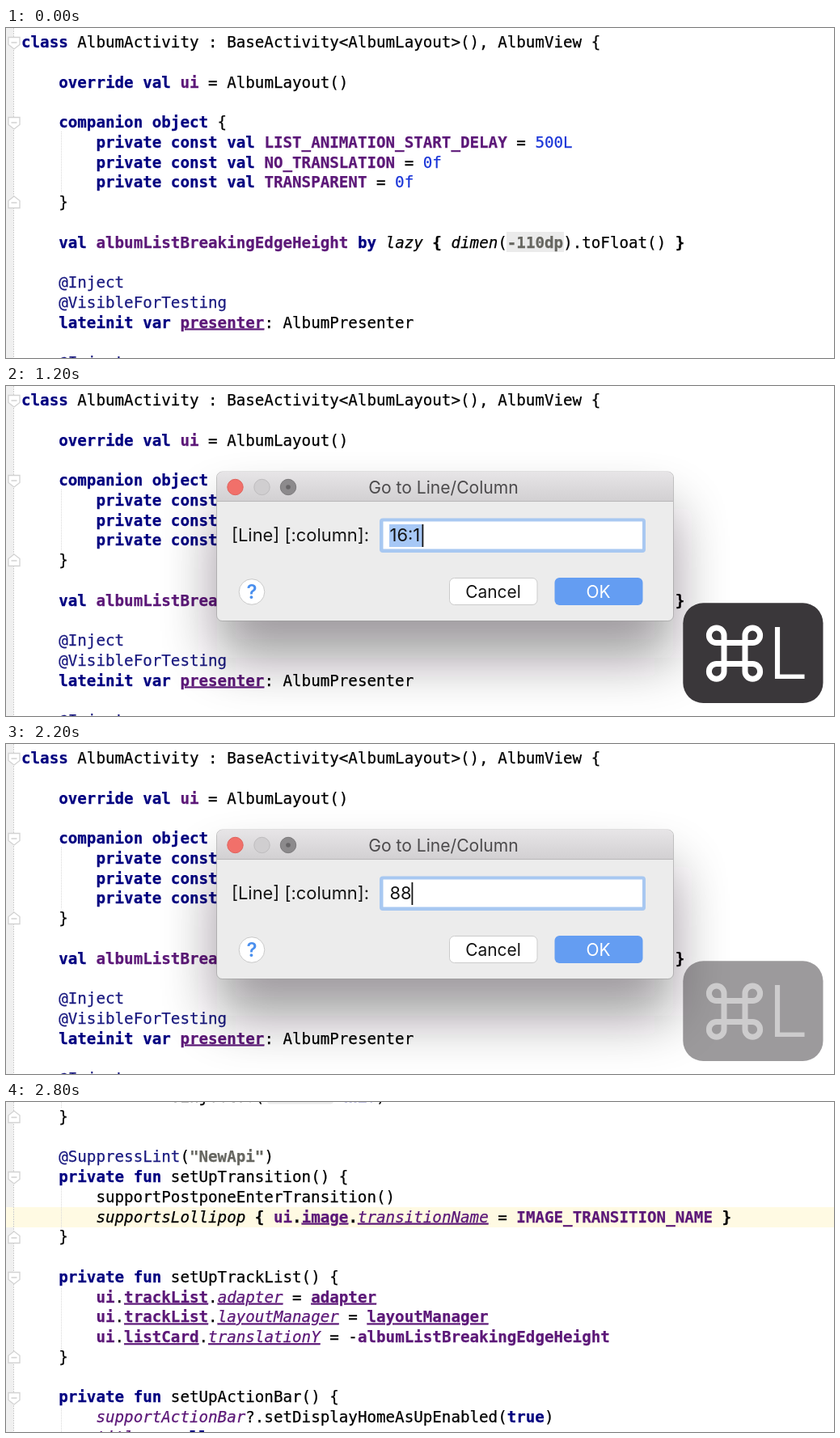
Recreate the animation shown at these times as an HTML page. Size 1024 by 408 pixels, loop 3.2 s.

```html
<!DOCTYPE html>
<html lang="en">
<head>
<meta charset="utf-8">
<title>Go to line</title>
<style>
html, body { margin: 0; width: 100%; height: 100%; overflow: hidden; background: #fff; }
svg { display: block; width: 100vw; height: 100vh; }
text { white-space: pre; }
.code { font: 19.2px "DejaVu Sans Mono", monospace; color: #000; }
.code text, .code tspan { fill: currentColor; stroke: currentColor; stroke-width: .25px; }
.k, .p, .u, .b, .f { font-weight: bold; }
.k { color: #000080; }
.a { color: #1a1a80; }
.n { color: #1a35d8; }
.p, .u, .q, .v { color: #5c1878; }
.u, .v { text-decoration: underline 1.4px; text-underline-offset: 3px; text-decoration-skip-ink: none; }
.i, .q, .v { font-style: italic; }
.f { color: #666660; }
.ui { font: 20.9px Inter, "Open Sans", sans-serif; fill: #141414; }
.big { font-size: 21.9px; }
.mid { text-anchor: middle; }
</style>
</head>
<body>
<svg viewBox="0 0 1024 408">
  <defs>
    <linearGradient id="bar" x2="0" y2="1">
      <stop stop-color="#e7e5e7"/><stop offset="1" stop-color="#d2d0d2"/>
    </linearGradient>
    <filter id="blur" filterUnits="userSpaceOnUse" x="100" y="20" width="900" height="540">
      <feGaussianBlur stdDeviation="34"/>
    </filter>
  </defs>
  <rect width="1024" height="408" fill="#fff"/>
  <rect width="9" height="408" fill="#f0f0f0"/>
  <rect id="row" y="130" width="1024" height="25" fill="#fffae3"/>
  <path d="M9.5 0V408" stroke="#cfcfcf" stroke-dasharray="2 1"/>
  <g id="top" class="code"></g>
  <g id="bottom" class="code"></g>
  <rect id="caret" x="19" y="131" width="2.4" height="23"/>

  <g id="dialog" class="ui">
    <rect x="261" y="152" width="564" height="184" rx="8" fill="#120816" opacity=".42" filter="url(#blur)"/>
    <rect x="260.5" y="106" width="565" height="184.5" rx="7" fill="#ececec" stroke="#000" stroke-opacity=".2"/>
    <path d="M261 142V113a7 7 0 0 1 7-7H818a7 7 0 0 1 7 7V142Z" fill="url(#bar)"/>
    <path d="M261 142.5H825" stroke="#b9b7b9"/>
    <circle cx="283.5" cy="125" r="9.7" fill="#f1706a" stroke="#e0605a"/>
    <circle cx="316.5" cy="125" r="9.7" fill="#d0ced0" stroke="#bebcbe"/>
    <circle cx="349" cy="125" r="9.7" fill="#8c8a8c" stroke="#7c7a7c"/>
    <circle cx="349" cy="125" r="2.8" fill="#666466"/>
    <text class="mid" x="541" y="133" fill="#4c4a4c" font-size="21.1">Go to Line/Column</text>
    <text class="big" x="279" y="192">[Line] [:column]:</text>
    <rect x="462" y="163.5" width="329" height="42.5" rx="4" fill="#a8c8f1"/>
    <rect x="466.5" y="167.5" width="320.5" height="34" fill="#fff"/>
    <rect id="pick" x="474" y="171" width="41" height="28" fill="#a7c8f6"/>
    <text id="entry" class="big" x="474.5" y="192"></text>
    <rect id="bead" y="171" width="1.8" height="28"/>
    <circle cx="304" cy="254.5" r="15.8" fill="#fff" stroke="#c9c9c9"/>
    <text class="mid" x="304" y="263" font-size="24" font-weight="600" fill="#4a8fee">?</text>
    <rect x="548.5" y="237.5" width="108.5" height="33" rx="6" fill="#fff" stroke="#cbcbcb"/>
    <text class="mid" x="602.5" y="262">Cancel</text>
    <rect x="678.5" y="237" width="109" height="34" rx="6" fill="#649df2"/>
    <text class="mid" x="732.5" y="262" fill="#fff">OK</text>
  </g>

  <g id="keys">
    <rect x="837.3" y="268.3" width="173.2" height="123.7" rx="25" fill="#3a373a"/>
    <path d="M888 308.3V352.9a9.3 9.3 0 1 1-9.3-9.3H923.3a9.3 9.3 0 1 1-9.3 9.3V308.3a9.3 9.3 0 1 1 9.3 9.3H878.7a9.3 9.3 0 1 1 9.3-9.3Z"
      fill="none" stroke="#fff" stroke-width="7"/>
    <text x="942.5" y="362" fill="#fff" style="font:350 88px Inter,sans-serif">L</text>
  </g>
</svg>
<script>
const NS = 'http://www.w3.org/2000/svg';
const $ = id => document.getElementById(id);
const LEFT = 19, PITCH = 24.75, LOOP = 3200;

// Spans are written ~style text~
const head = [
  '~k class~ AlbumActivity : BaseActivity<AlbumLayout>(), AlbumView {',
  '',
  '    ~k override val~ ~p ui~ = AlbumLayout()',
  '',
  '    ~k companion object~ {',
  '        ~k private const val~ ~p LIST_ANIMATION_START_DELAY~ = ~n 500L~',
  '        ~k private const val~ ~p NO_TRANSLATION~ = ~n 0f~',
  '        ~k private const val~ ~p TRANSPARENT~ = ~n 0f~',
  '    }',
  '',
  '    ~k val~ ~p albumListBreakingEdgeHeight~ ~k by~ ~i lazy~ ~b {~ ~i dimen~(~f -110dp~).toFloat() ~b }~',
  '',
  '    ~a @Inject~',
  '    ~a @VisibleForTesting~',
  '    ~k lateinit var~ ~u presenter~: AlbumPresenter',
  '',
  '    ~a @Inject~'
];

const body = [
  '                .injectTo(        ~k this~)',
  '    }',
  '',
  '    ~a @SuppressLint~(~f "NewApi"~)',
  '    ~k private fun~ setUpTransition() {',
  '        supportPostponeEnterTransition()',
  '        ~i supportsLollipop~ ~b {~ ~p ui~~b .~~u image~~b .~~v transitionName~ = ~p IMAGE_TRANSITION_NAME~ ~b }~',
  '    }',
  '',
  '    ~k private fun~ setUpTrackList() {',
  '        ~p ui~.~u trackList~.~v adapter~ = ~u adapter~',
  '        ~p ui~.~u trackList~.~v layoutManager~ = ~u layoutManager~',
  '        ~p ui~.~u listCard~.~v translationY~ = -~p albumListBreakingEdgeHeight~',
  '    }',
  '',
  '    ~k private fun~ setUpActionBar() {',
  '        ~q supportActionBar~?.setDisplayHomeAsUpEnabled(~k true~)',
  '        ~q title~ = ~k null~'
];

function add(parent, tag, attrs, text) {
  const el = document.createElementNS(NS, tag);
  for (const name in attrs) el.setAttribute(name, attrs[name]);
  if (text) el.textContent = text;
  return parent.appendChild(el);
}

function write(page, lines, base) {
  lines.forEach((line, i) => {
    const row = add(page, 'text', { x: LEFT, y: base + i * PITCH });
    for (const [, style, styled, plain] of line.matchAll(/~(\w) (.*?)~|([^~]+)/g))
      add(row, 'tspan', style ? { class: style } : {}, styled || plain);
  });
}

function fold(page, y, dir) {
  add(page, 'path', {
    d: `M3 ${y - 6.5 * dir}H17V${y + 2.5 * dir}L10 ${y + 8 * dir}L3 ${y + 2.5 * dir}ZM6.5 ${y}H13.5`,
    fill: '#fff', stroke: '#d2d2d2', 'stroke-width': 1.3
  });
}

function guide(page, y1, y2) {
  add(page, 'path', { d: `M68.5 ${y1}V${y2}`, stroke: '#d8d8d8', 'stroke-dasharray': '1 1' });
}

const upper = $('top'), lower = $('bottom');
add(upper, 'rect', { x: 619, y: 252, width: 71, height: 25, fill: '#ebebeb' });
add(lower, 'rect', { x: 323, y: -18, width: 82, height: 20.5, rx: 4, fill: '#ebebeb' });
write(upper, head, 24);
write(lower, body, .2);
guide(upper, 128, 204);
[[0, 7], [106, 156], [230, 305], [379, 408]].forEach(r => guide(lower, ...r));
[[18, 1], [117, 1], [216, -1]].forEach(m => fold(upper, ...m));
[[19, -1], [93, 1], [168, -1], [217, 1], [316, -1], [366, 1]].forEach(m => fold(lower, ...m));

const show = (el, on) => { el.style.display = on ? '' : 'none'; };
const [row, caret, dialog, keys, pick, entry, bead] =
  ['row', 'caret', 'dialog', 'keys', 'pick', 'entry', 'bead'].map($);

function draw(t) {
  const jumped = t >= 2400, open = t >= 800 && !jumped;
  show(upper, !jumped);
  show(lower, jumped);
  show(row, jumped);
  show(caret, jumped && t < 2800);
  show(dialog, open);
  show(keys, open);
  if (!open) return;
  const typed = t < 2000 ? '16:1' : t < 2200 ? '8' : '88';
  entry.textContent = typed;
  show(pick, t < 2000);
  bead.setAttribute('x', { '16:1': 514.5, '8': 488, '88': 501.5 }[typed]);
  for (const part of keys.children) part.setAttribute('opacity', t < 2200 ? 1 : .5);
}

const start = performance.now();
function tick() {
  draw((performance.now() - start) % LOOP);
  requestAnimationFrame(tick);
}
draw(0);
requestAnimationFrame(tick);
</script>
</body>
</html>
```
